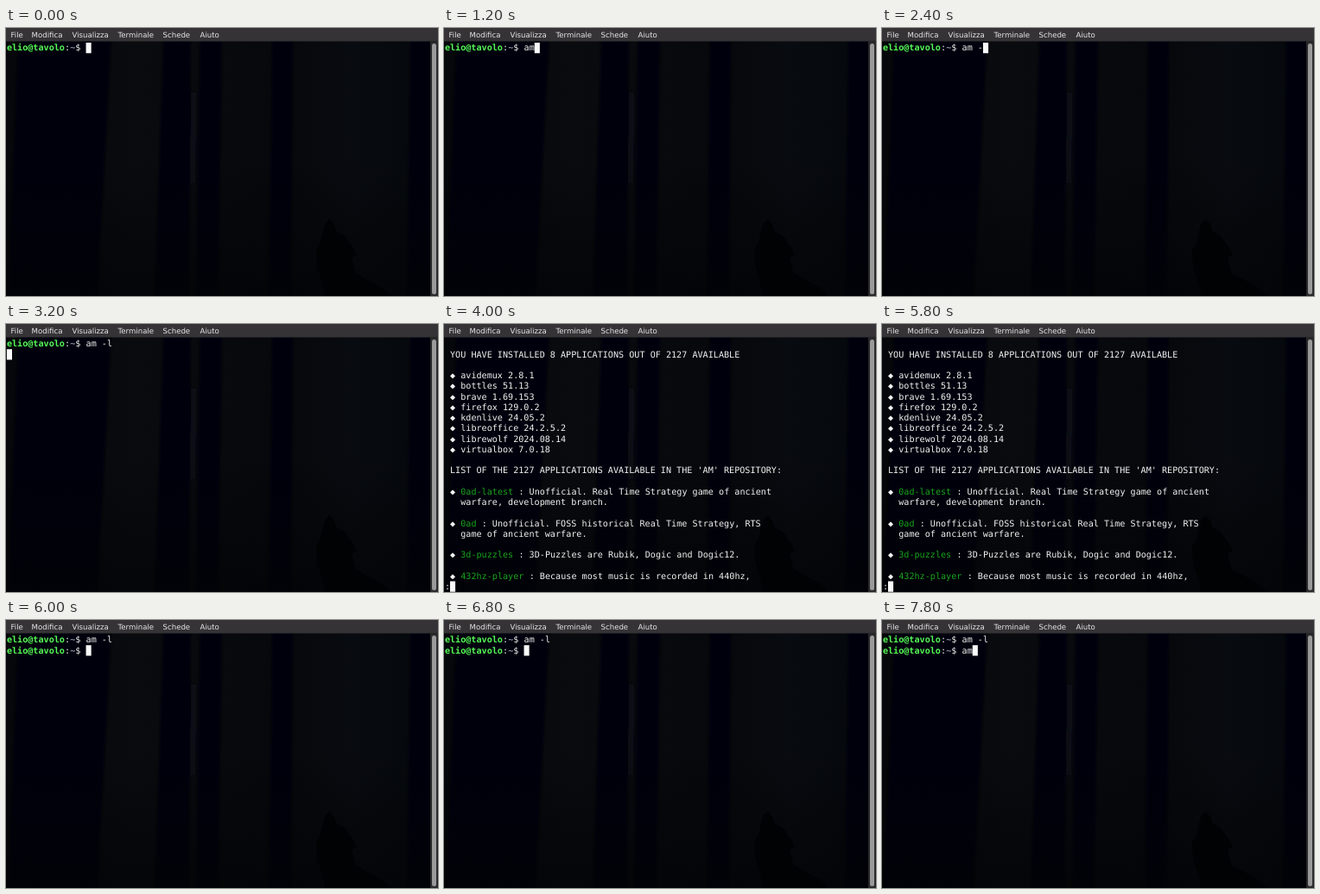
These frames come from a looping animation (500 by 311 pixels, 8000 ms). An HTML page:

```html
<!DOCTYPE html>
<html lang="it">
<head>
<meta charset="utf-8">
<title>Terminale</title>
<style>
  html, body { margin: 0; width: 100%; height: 100%; overflow: hidden; background: #05070a; }
  svg { display: block; width: 100vw; height: 100vh; }
  text { white-space: pre; text-rendering: geometricPrecision; }
  .term { font: 10.15px "DejaVu Sans Mono", monospace; fill: #f2f2f2; }
  .bold { font-weight: bold; }
  .menu { font: 8.6px "DejaVu Sans", sans-serif; fill: #e8e6e8; }
</style>
</head>
<body>
<svg viewBox="0 0 500 311" preserveAspectRatio="none">
  <defs>
    <linearGradient id="night" x2="1" y2="0">
      <stop offset="0" stop-color="#05070a"/>
      <stop offset=".3" stop-color="#0a0b0f"/>
      <stop offset=".65" stop-color="#07080c"/>
      <stop offset=".8" stop-color="#080b10"/>
      <stop offset="1" stop-color="#04080c"/>
    </linearGradient>
    <linearGradient id="ground" x2="0" y2="1">
      <stop offset=".45" stop-color="#020305" stop-opacity="0"/>
      <stop offset="1" stop-color="#020305" stop-opacity=".7"/>
    </linearGradient>
    <filter id="soft"><feGaussianBlur stdDeviation="1.5"/></filter>
  </defs>

  <rect y="15" width="500" height="296" fill="url(#night)"/>
  <g filter="url(#soft)">
    <path d="M14 12H122L106 314H2Z" fill="#020407"/>
    <path d="M182 12H214L212 314H172Z" fill="#050609"/>
    <path d="M224 12H250L246 314H220Z" fill="#050609"/>
    <path d="M308 12H332L330 314H304Z" fill="#040609"/>
    <path d="M468 12H492V314H464Z" fill="#03060a"/>
    <path d="M214 75H220L219 180H213Z" fill="#0d0f13"/>
  </g>
  <rect y="15" width="500" height="296" fill="url(#ground)"/>
  <path d="M375 222L380 228L382 236L392 241L402 255L406 263L400 267L404 284L420 293L436 302L446 311H370L365 292L360 276L359 258L364 250L367 236L370 226Z" fill="#010203"/>

  <g id="shell"></g>
  <g id="pager"></g>
  <rect id="cursor" width="6.1" height="12.24" fill="#fafafa"/>

  <rect width="500" height="15.5" fill="#353335"/>
  <g id="menu"></g>
  <rect x="491" y="15.5" width="9" height="295.5" fill="#2a292b"/>
  <rect x="493" y="18" width="5" height="291" rx="2.5" fill="#9b9a9b"/>
</svg>
<script>
const LOOP = 8000, CELL = 6.11, ROW = 12.24, LEFT = 0.9, TOP = 17;
const GREEN = '#18a51c', LIME = '#55fa55', BLUE = '#8d95ab';
const byId = id => document.getElementById(id);
const colX = col => LEFT + col * CELL;
const rowY = row => TOP + row * ROW;

function addText(parent, x, y, str, cls, fill) {
  const el = document.createElementNS('http://www.w3.org/2000/svg', 'text');
  el.setAttribute('x', x);
  el.setAttribute('y', y);
  el.setAttribute('class', cls);
  if (fill) el.style.fill = fill;
  el.textContent = str;
  parent.append(el);
  return el;
}

function put(parent, col, row, str, fill, bold) {
  return addText(parent, colX(col), rowY(row) + 9.45, str, bold ? 'term bold' : 'term', fill);
}

[['File', 5.5], ['Modifica', 29.5], ['Visualizza', 76.5], ['Terminale', 129.5],
 ['Schede', 181.5], ['Aiuto', 224.5]]
  .forEach(([label, x]) => addText(byId('menu'), x, 11, label, 'menu'));

// One prompt line with an editable command
function makeLine(row) {
  const g = document.createElementNS('http://www.w3.org/2000/svg', 'g');
  byId('shell').append(g);
  put(g, 0, row, 'elio@tavolo', LIME, true);
  put(g, 11, row, ':');
  put(g, 12, row, '~', BLUE, true);
  put(g, 13, row, '$');
  return { g, cmd: put(g, 15, row, '') };
}
const lines = [makeLine(0), makeLine(1)];

// Each entry: row, text, optional package name shown in green
const pager = byId('pager');
put(pager, 1, 1, 'YOU HAVE INSTALLED 8 APPLICATIONS OUT OF 2127 AVAILABLE');
['avidemux 2.8.1', 'bottles 51.13', 'brave 1.69.153', 'firefox 129.0.2', 'kdenlive 24.05.2',
 'libreoffice 24.2.5.2', 'librewolf 2024.08.14', 'virtualbox 7.0.18']
  .forEach((app, i) => put(pager, 1, 3 + i, '◆ ' + app));
put(pager, 1, 12, "LIST OF THE 2127 APPLICATIONS AVAILABLE IN THE 'AM' REPOSITORY:");
[
  [14, 'Unofficial. Real Time Strategy game of ancient', '0ad-latest'],
  [15, 'warfare, development branch.'],
  [17, 'Unofficial. FOSS historical Real Time Strategy, RTS', '0ad'],
  [18, 'game of ancient warfare.'],
  [20, '3D-Puzzles are Rubik, Dogic and Dogic12.', '3d-puzzles'],
  [22, 'Because most music is recorded in 440hz,', '432hz-player']
].forEach(([row, str, name]) => {
  if (!name) return put(pager, 3, row, str);
  put(pager, 1, row, '◆');
  put(pager, 3, row, name, GREEN);
  put(pager, 3 + name.length, row, ' : ' + str);
});
put(pager, 0, 23, ':');

// time, first command, second command (null: no prompt yet), cursor column, cursor row
const steps = [
  [0, '', null, 15, 0],
  [800, 'am', null, 17, 0],
  [2200, 'am ', null, 18, 0],
  [2400, 'am -', null, 19, 0],
  [2800, 'am -l', null, 20, 0],
  [3000, 'am -l', null, 0, 1],
  [4000, null, null, 1, 23],
  [6000, 'am -l', '', 15, 1],
  [7800, 'am -l', 'am', 17, 1]
];

const show = (el, on) => { el.style.display = on ? '' : 'none'; };
let shown;

function draw(now) {
  const t = now % LOOP;
  const step = steps.findLast(s => s[0] <= t);
  if (step !== shown) {
    shown = step;
    const [, first, second, col, row] = step;
    [first, second].forEach((cmd, i) => {
      show(lines[i].g, cmd !== null);
      lines[i].cmd.textContent = cmd || '';
    });
    show(pager, first === null);
    byId('cursor').setAttribute('x', colX(col));
    byId('cursor').setAttribute('y', rowY(row));
  }
}

const start = performance.now();
function tick() {
  draw(performance.now() - start);
  requestAnimationFrame(tick);
}
tick();
</script>
</body>
</html>
```
